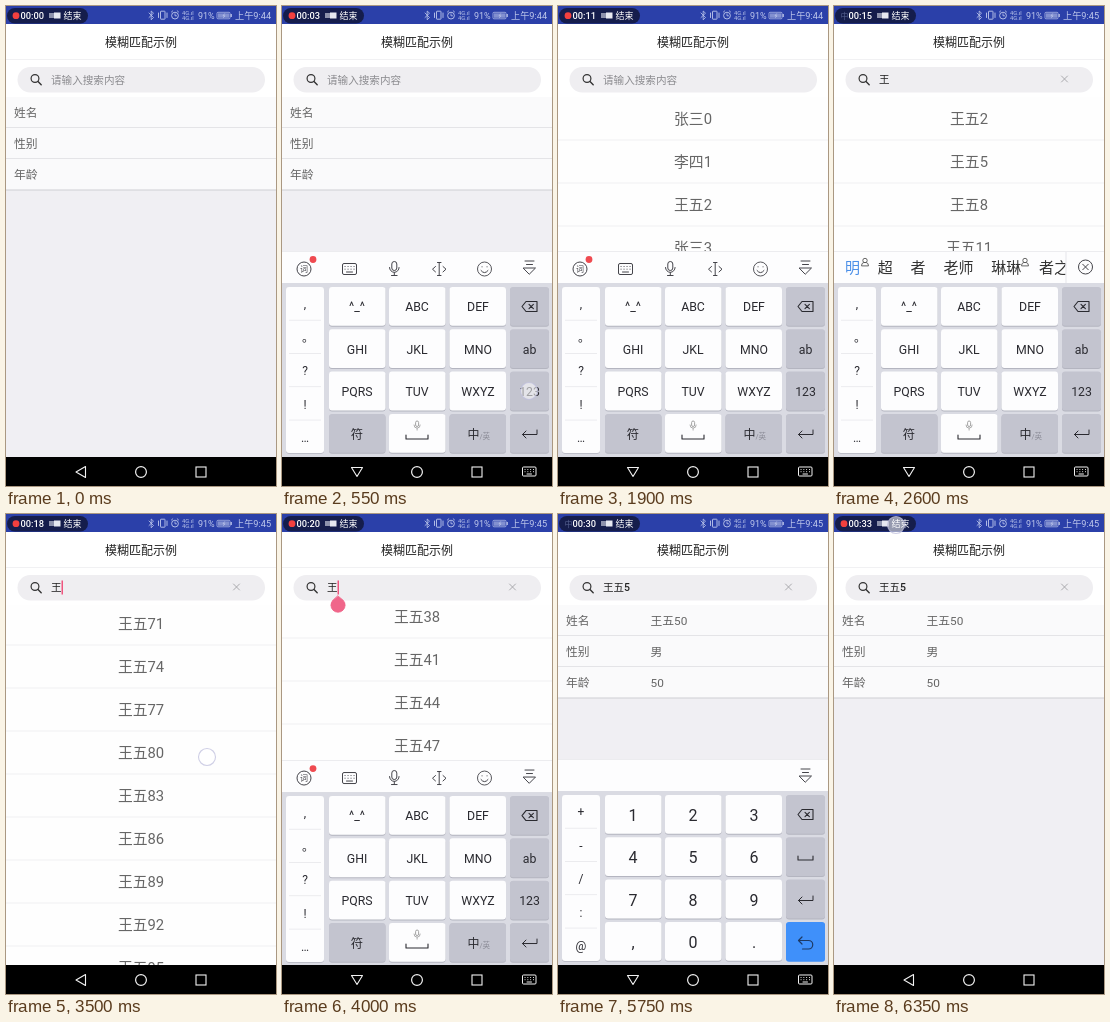
Recreate the animation shown at these times as an HTML page. Size 270 by 480 pixels, loop 6.4 s.

```html
<!DOCTYPE html>
<html lang="zh-CN">
<head>
<meta charset="utf-8">
<title>模糊匹配示例</title>
<style>
html, body { margin: 0; width: 100%; height: 100%; overflow: hidden; background: #000; }
svg { display: block; width: 100vw; height: 100vh; font-family: Roboto, "Noto Sans CJK SC", "Noto Sans CJK", sans-serif; }
.medium { font-weight: 500; }
</style>
</head>
<body>
<svg id="stage" viewBox="0 0 270 480"></svg>
<script>
const STEP = 50, STEPS = 128;
const ROW = 43, LIST_TOP = 91;
const INK = '#2a2a30', ICON = '#44444a', GREY = '#666', SHADOW = '#b4b5c0';

// Tables are keyed by step number.
const queries = [[0, ''], [18, '1'], [21, '11'], [32, ''], [50, '王'], [92, '王五'], [102, '王五5']];
const chosen = [[0, null], [27, 11], [113, 50]];
const listOpen = [[0, false], [18, true], [27, false], [32, true], [113, false]];
const keypads = [[0, 'letters'], [12, 'digits'], [36, 'letters'], [97, 'digits']];
const strips = [[0, ''], [41, '我 为 无 问题 晚 完'], [43, '晚 万 王 玩 完'], [45, '万 玩 晚 完 网'],
  [47, '王 网 往 望 忘 旺'], [50, '明 超 者 老师 琳琳 者之'], [57, ''],
  [85, '我 为 无 问题 晚 完'], [88, '五 无 物 务 舞 屋'], [92, '一 的 是 了 和 在']];
const keyboardUp = [[6, 0], [8, 1], [55, 1], [57, 0], [78, 0], [80, .995], [81, 1], [118, 1], [120, 0]];
const scroll = [[53, 0], [56, 75], [58, 150], [60, 330], [63, 560], [66, 800], [69, 990], [70, 992],
  [72, 835], [74, 690], [76, 575], [78, 526], [91, 526]];
const seconds = [[0, 0], [25, 8.3], [52, 15.3], [70, 18.7], [80, 20.5], [103, 27.4], [127, 33.3]];
// first step, last step, x, y, end y
const touches = [
  [4, 6, 120, 73], [10, 11, 247, 385], [17, 18, 75, 301], [20, 21, 75, 301], [24, 26, 231, 117],
  [31, 32, 231, 73], [35, 36, 247, 428], [40, 41, 196, 386], [43, 43, 135, 301], [45, 45, 196, 343],
  [47, 47, 75, 343], [49, 50, 19, 262], [54, 56, 200, 215, 140], [58, 60, 203, 350, 180],
  [62, 63, 203, 340, 200], [65, 66, 203, 340, 200], [70, 72, 201, 243, 400], [77, 78, 60, 73],
  [85, 86, 196, 386], [88, 89, 135, 386], [91, 92, 19, 262], [95, 96, 247, 386],
  [102, 103, 142, 356], [111, 112, 135, 156], [118, 119, 75, 465], [126, 127, 62, 11]];

const people = Array.from({ length: 100 }, (_, i) => ['张三', '李四', '王五'][i % 3] + i);

const last = (table, n) => table.filter(e => e[0] <= n).pop();
const at = (table, n) => last(table, n)[1];
function lerp(table, n) {
  const i = table.findIndex(e => e[0] > n);
  if (i < 0) return table[table.length - 1][1];
  if (i === 0) return table[0][1];
  const [a, v] = table[i - 1], [b, w] = table[i];
  return v + (w - v) * (n - a) / (b - a);
}

const MEDIUM = 'class="medium"';
const rect = (x, y, w, h, fill, r = 0, more = '') =>
  `<rect x="${x}" y="${y}" width="${w}" height="${h}" rx="${r}" fill="${fill}" ${more}/>`;
const text = (s, x, y, size, fill, anchor = 'start', more = '') =>
  `<text x="${x}" y="${y}" font-size="${size}" fill="${fill}" text-anchor="${anchor}" ${more}>${s}</text>`;
const mid = (s, x, y, size, fill = INK, more = '') => text(s, x, y, size, fill, 'middle', more);
const path = (d, stroke, w = 1, fill = 'none') =>
  `<path d="${d}" fill="${fill}" stroke="${stroke}" stroke-width="${w}" stroke-linejoin="round" stroke-linecap="round"/>`;
const disc = (x, y, r, fill, stroke = 'none', w = 1) =>
  `<circle cx="${x}" cy="${y}" r="${r}" fill="${fill}" stroke="${stroke}" stroke-width="${w}"/>`;

function statusBar(n) {
  const pale = '#c0c9ec';
  const sec = String(Math.floor(lerp(seconds, n))).padStart(2, '0');
  const lit = n * 3 % 10 < 5;
  return rect(0, 0, 270, 18, '#2b40a9') + rect(1, 2, 81, 15.5, '#151d4c', 7.8) +
    (lit ? disc(10, 9.7, 3.4, '#f2403f') : n > 7 ? mid('中', 10.5, 12.8, 8, '#55608f') : '') +
    text('00:' + sec, 14.5, 12.8, 9.3, '#fff', 'start', MEDIUM) +
    rect(43, 7, 5, 5, '#8d92ac') + rect(48, 6.5, 6.5, 6, '#e6e8f0') +
    text('结束', 57.5, 13, 9, '#fff', 'start', MEDIUM) +
    path('M143 7l4.5 4.5-2.3 2.3V5l2.3 2.2L143 11.5', pale, .8) +
    rect(154.5, 5.2, 4.5, 8, 'none', .5, `stroke="${pale}" stroke-width=".9"`) +
    path('M152.5 7v4.5M161 7v4.5', pale, .9) +
    disc(169, 9.6, 3.4, 'none', pale, .9) + path('M169 7.8v2h1.5M165.4 6l1.4-1.2M172.6 6l-1.4-1.2', pale, .8) +
    text('4G.ıl', 176, 8.9, 5.8, pale) + text('4G.ıl', 176, 13.7, 5.8, pale) +
    text('91%', 192, 12.8, 9, pale) +
    rect(211, 6.3, 13, 6.5, 'none', 1, `stroke="${pale}" stroke-width=".7"`) +
    rect(212, 7.3, 11, 4.5, '#8290d0') + rect(224.5, 8, 1.3, 3, pale) + path('M218.5 7.8l-1.5 2h2l-1.5 1.700', pale, .7) +
    text(n < 40 ? '上午9:44' : '上午9:45', 229, 13, 9.2, pale);
}

function searchBox(n) {
  const [edit, q] = last(queries, n);
  const width = [...q].reduce((w, c) => w + (c > '9' ? 10.5 : 5.9), 0);
  const held = n >= 79 && n < 85;
  const focused = n >= 7 && n < 113;
  const x = 45 + width;
  return rect(0, 18, 270, 73, '#fff') + rect(0, 53, 270, 1, '#f1f1f3') +
    mid('模糊匹配示例', 135, 41, 12, '#222', MEDIUM) +
    rect(11.5, 61, 247.5, 25.5, '#efeef1', 12.7) +
    disc(29, 72.5, 3.9, 'none', '#333', 1.2) + path('M32 75.6l3.2 3.2', '#333', 1.4) +
    (q ? text(q, 45, 77.3, 10.5, '#222', 'start', MEDIUM) + path('M227.5 70l6 6M233.5 70l-6 6', '#a2a2a6', .9)
       : text('请输入搜索内容', 45, 77.5, 10.6, '#8b8b8f')) +
    (focused && (held || (n - edit) % 4 < 2) ? rect(x, 66.5, 1.5, 14, '#f0557f') : '') +
    (held ? path(`M${x + .5} 82l5.1 4.2a7.1 7.1 0 1 1-10.2 0z`, '#f0668a', .8, '#f0668a') : '');
}

function details(n) {
  const id = at(chosen, n);
  const values = id === null ? ['', '', ''] : [people[id], '男', id];
  return rect(0, 91, 270, 361, '#f0eff3') + ['姓名', '性别', '年龄'].map((label, i) => {
    const y = 91 + 31 * i;
    return rect(0, y, 270, 31, '#fafafb') + rect(0, y + 30.5, 270, 1, '#cfcfd3') +
      text(label, 8, y + 20, 11.8, GREY) + text(values[i], 92.5, y + 20, 11.8, GREY);
  }).join('');
}

function results(n) {
  if (!at(listOpen, n)) return '';
  const found = people.filter(p => p.includes(at(queries, n)));
  const shift = n < 92 ? lerp(scroll, n) : 0;
  const bottom = Math.min(452, LIST_TOP + ROW * found.length - shift);
  let out = rect(0, LIST_TOP, 270, 361, 'rgba(60,45,60,.32)') + rect(0, LIST_TOP, 270, bottom - LIST_TOP, '#fefefe');
  found.forEach((name, i) => {
    const y = LIST_TOP + ROW * i - shift;
    if (y > 50 && y < 452) out += mid(name, 135, y + 27.3, 14.8, GREY) + rect(0, y + ROW - .5, 270, 1, '#f1f1f3');
  });
  return out;
}

const collapse = path('M243 255h9M244.5 258.5h6M241.5 262h12l-6 6z', ICON, 1);

function toolbar() {
  return disc(22, 263, 7, 'none', ICON, 1) + mid('词', 22, 266, 8, ICON) + disc(31, 253.5, 3.4, '#ef4a50') +
    rect(60.5, 257.5, 14, 11, 'none', 1.5, `stroke="${ICON}"`) +
    path('M63 260.5h.1M66 260.5h.1M69 260.5h.1M72 260.5h.1M63 263.2h.1M66 263.2h.1M69 263.2h.1M72 263.2h.1M64.5 266h6', ICON) +
    rect(109.8, 255.5, 5, 9, 'none', 2.5, `stroke="${ICON}"`) +
    path('M107.5 261.5a4.8 4.8 0 0 0 9.6 0M112.3 266.5v3M109.5 269.5h5.6', ICON) +
    path('M155.5 256.5h3.5M157.2 256.5v13M155.5 269.5h3.5M153.5 260.5l-3 2.7 3 2.7M161 260.5l3 2.7-3 2.7', ICON) +
    disc(202.5, 263, 7, 'none', ICON, .9) + path('M199 264.5q3.5 4.5 7 0M200 260.8h.1M205 260.8h.1', ICON) +
    collapse;
}

function candidates(words, linked) {
  const contact = x => disc(x, 254.5, 2.2, '#fff', '#555', .9) + path(`M${x - 3.5} 259.5q0-2.6 2.3-3h2.4q2.3.4 2.3 3z`, '#555', .9);
  let x = 11;
  const row = words.split(' ').map((w, i) => {
    const s = text(w, x, 267, 15, i ? '#333' : '#4b8fe8');
    x += w.length * 15 + 17.8;
    return s;
  }).join('');
  return `<g clip-path="url(#strip)">${row}</g>` + (linked ? contact(31) + contact(191) : '') +
    rect(231.5, 246, 1, 31, '#e6e6ea') + disc(251.5, 261, 7, 'none', ICON, 1) +
    path('M248.7 258.2l5.6 5.6M254.3 258.2l-5.6 5.6', ICON, 1);
}

const key = (col, row, fill = '#fdfdfe', shadow = SHADOW) => {
  const x = [47, 107, 167.5, 228][col], y = 281 + 42.3 * row, w = col === 3 ? 39 : 56.5;
  return rect(x, y + .8, w, 39, shadow, 3) + rect(x, y, w, 38.8, fill, 3);
};
const keyX = [75, 135, 196, 247.5];
const enterIcon = y => path(`M255 ${y - 4}v4.5h-14.5M244 ${y - 3}l-3.5 3.5 3.5 3.5`, INK, 1);
const spaceIcon = (x, y, w) => path(`M${x - w} ${y - 2}v4h${2 * w}v-4`, INK, 1.1);

function keyboard(n) {
  const digits = at(keypads, n) === 'digits';
  const dark = '#c3c4cf', blue = '#3f90fa';
  const words = at(strips, n);
  let out = rect(0, 245, 270, 33, '#fdfdfe') + rect(0, 245, 270, .8, '#e9e9ec') + rect(0, 277, 270, 175, '#dadbe3');
  out += digits ? collapse : words ? candidates(words, n >= 50 && n < 85) : toolbar();

  out += rect(4, 281.8, 38, 166, SHADOW, 3) + rect(4, 281, 38, 166, '#fdfdfe', 3);
  [...(digits ? '+-/:@' : ',。?!…')].forEach((c, i) => {
    out += mid(c, c === '。' ? 26 : 23, 302 + 33.6 * i, 12) + (i ? rect(7, 280.5 + 33.3 * i, 32, .7, '#e4e4e9') : '');
  });

  const labels = digits ? [...'123456789,0.'] : ['^_^', 'ABC', 'DEF', 'GHI', 'JKL', 'MNO', 'PQRS', 'TUV', 'WXYZ', '符', '', ''];
  labels.forEach((label, i) => {
    const col = i % 3, row = Math.floor(i / 3);
    const shaded = !digits && (i === 9 || i === 11);
    out += key(col, row, shaded ? dark : undefined) +
      mid(label, keyX[col], (digits ? 306.5 : 305) + 42.5 * row, digits ? 16 : 12.3);
  });
  for (let row = 0; row < 4; row++) out += digits && row === 3 ? key(3, row, blue, blue) : key(3, row, dark);
  out += path('M240 300.5l4-5h11v10h-11zM247 298.3l4.4 4.4M251.4 298.3l-4.4 4.4', INK, 1.1);

  if (digits) {
    out += spaceIcon(247.5, 344, 7.5) + enterIcon(386) +
      path('M244 423l-3.5 3.5 3.5 3.5M241 426.5h9.5a4 4 0 0 1 0 8.5h-6', '#1d3963', 1.2);
  } else {
    out += mid('ab', 247.5, 347.5, 12.3) + mid('123', 247.5, 390, 12.3) + enterIcon(428) +
      rect(133.6, 415, 3, 5.5, 'none', 1.5, 'stroke="#999" stroke-width=".9"') +
      path('M132 419a3.1 3.1 0 0 0 6.2 0M135.1 422.5v1.6', '#999', .8) + spaceIcon(135, 431, 11) +
      text('中', 185.5, 432.5, 12, INK) + text('/英', 197.5, 432.5, 7.5, '#8a8b96');
  }
  return out;
}

function navBar(up) {
  const w = '#f2f2f2';
  return rect(0, 451, 270, 29, '#000') +
    path(up ? 'M69.5 461.5h11l-5.5 9z' : 'M79.5 460.5v11l-9.5-5.5z', w, 1.1) +
    disc(135, 466, 5.4, 'none', w, 1.2) +
    rect(190, 461, 10, 10, 'none', 0, `stroke="${w}" stroke-width="1.1"`) +
    (up ? rect(240.5, 461, 13.5, 9, 'none', 1, `stroke="${w}"`) +
      path('M243 463.5h.1M245.8 463.5h.1M248.6 463.5h.1M251.4 463.5h.1M243 465.7h.1M245.8 465.7h.1M248.6 465.7h.1M251.4 465.7h.1M245 468h4.5', w) : '');
}

function touch(n) {
  const hit = touches.find(t => n >= t[0] && n <= t[1]);
  if (!hit) return '';
  const [a, b, x, y, endY = y] = hit;
  return disc(x, y + (endY - y) * (n - a) / Math.max(1, b - a), 8.5, 'rgba(255,255,255,.55)', 'rgba(190,190,220,.75)', 1.1);
}

function scene(n) {
  const up = lerp(keyboardUp, n);
  return '<defs><clipPath id="strip"><rect x="0" y="245" width="231.5" height="33"/></clipPath></defs>' +
    details(n) + results(n) +
    (up ? `<g transform="translate(0 ${(1 - up) * 207})">${keyboard(n)}</g>` : '') +
    searchBox(n) + statusBar(n) + navBar(up > 0) + touch(n);
}

const stage = document.getElementById('stage');
const start = performance.now();
let shown = -1;
function tick() {
  const n = Math.floor((performance.now() - start) / STEP) % STEPS;
  if (n !== shown) stage.innerHTML = scene(shown = n);
  requestAnimationFrame(tick);
}
tick();
</script>
</body>
</html>
```
